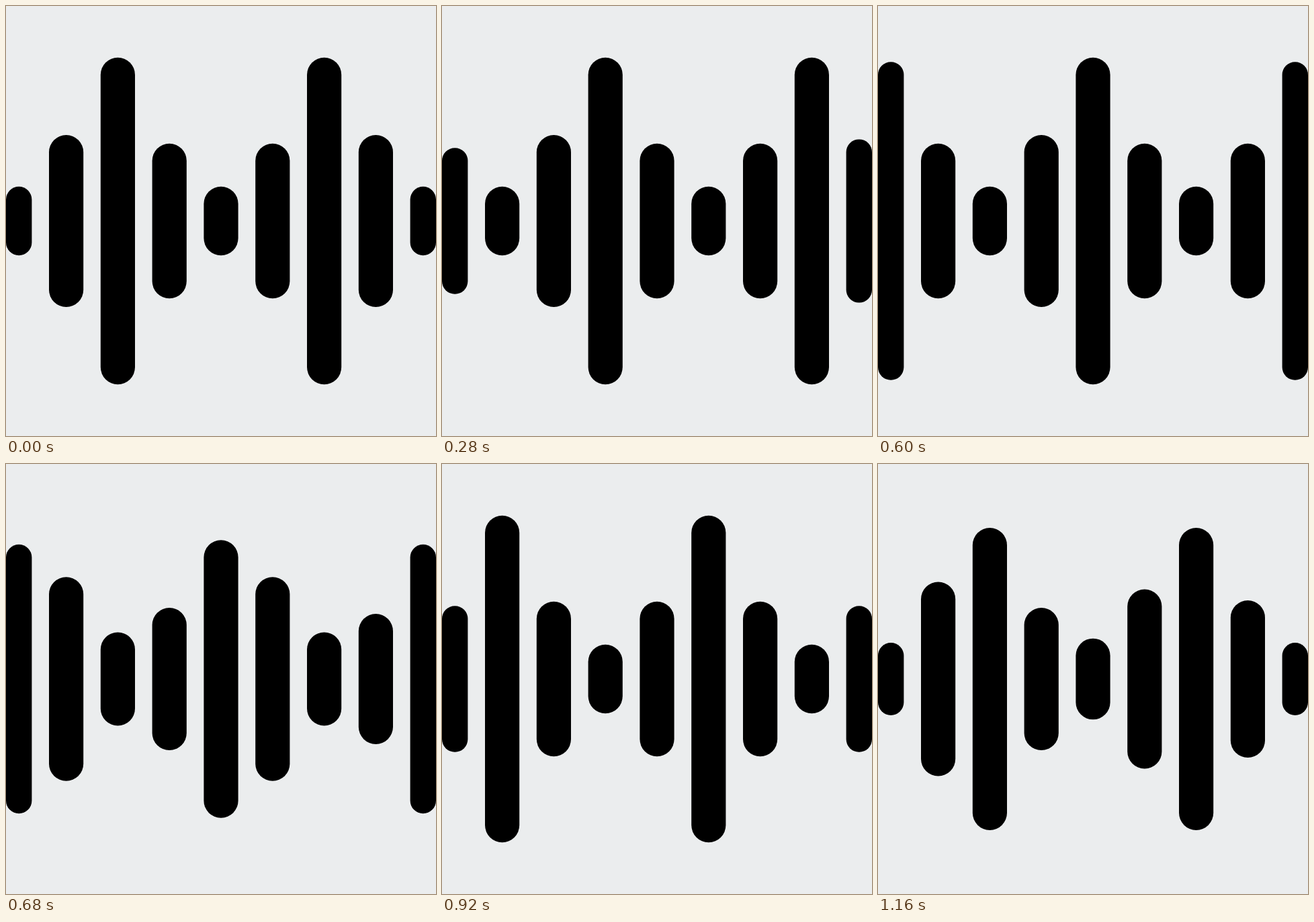
Animation of 640x640 px, one loop 1.2 s. Source, as an HTML page:

```html
<!DOCTYPE html>
<html>
<head>
<meta charset="utf-8">
<style>
  html, body { margin: 0; height: 100%; overflow: hidden; background: #ebedee; }
  svg { display: block; width: 100%; height: 100%; }
</style>
</head>
<body>
<svg viewBox="0 0 50 50"></svg>
<script>
const svg = document.querySelector('svg');
const COUNT = 9, LAST = COUNT - 1, MID = LAST / 2;
const STEP = 40, SLOTS = 30, SEGMENT = 7;
const LOW = 8, FLANK = 18, PEAK = 38;

const isEdge = i => i % LAST === 0;

// A wave four bars long moves one bar to the right per quarter of the loop
function keyHeight(i, quarter) {
  const k = quarter % 4;
  const offset = Math.abs(i - k - MID);
  const tall = offset === 3 && k < 3 ? 2 : 0; // outer flanks start a little taller
  const wave = [LOW, FLANK + tall, PEAK, FLANK + tall][offset % 4];
  return wave - (isEdge(i) && quarter > 0);
}

const bars = Array.from({ length: COUNT }, (_, i) => {
  const width = isEdge(i) ? 3 : 4;
  const rect = document.createElementNS('http://www.w3.org/2000/svg', 'rect');
  rect.setAttribute('x', i ? i * 6 - 1 : 0);
  rect.setAttribute('width', width);
  rect.setAttribute('rx', width / 2);
  svg.append(rect);
  return rect;
});

function draw(now) {
  const slot = Math.floor(now / STEP) % SLOTS;
  const pose = slot - (slot >= 10) - (slot >= 18); // two poses are held twice as long
  const quarter = Math.floor(pose / SEGMENT);
  const p = pose % SEGMENT / SEGMENT;
  bars.forEach((rect, i) => {
    const from = keyHeight(i, quarter);
    const height = from + (keyHeight(i, quarter + 1) - from) * p;
    rect.setAttribute('y', 25 - height / 2);
    rect.setAttribute('height', height);
  });
}

const start = performance.now();
function tick() {
  draw(performance.now() - start);
  requestAnimationFrame(tick);
}
tick();
</script>
</body>
</html>
```
